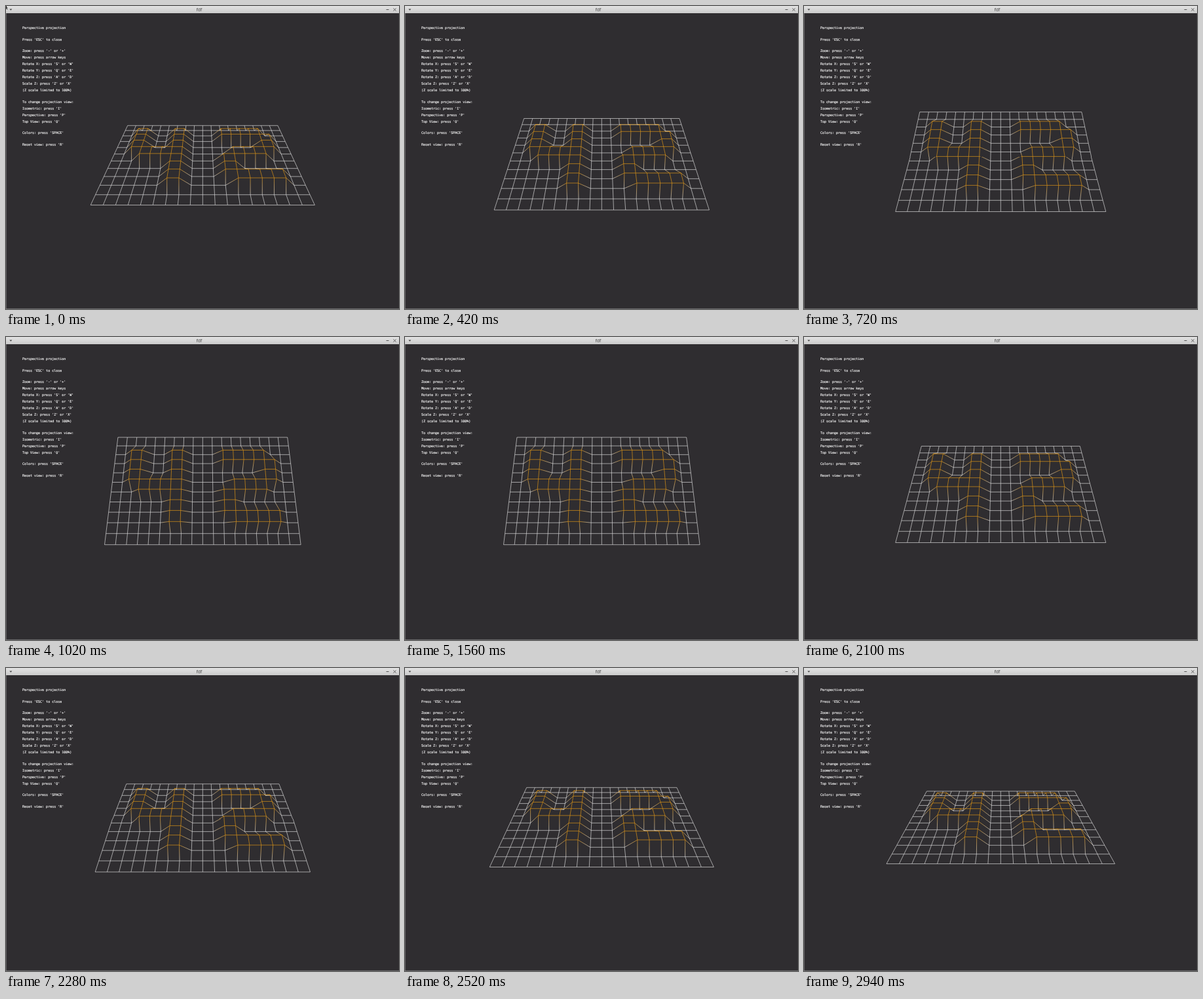
Animation of 600 by 462 pixels, one loop 3 s. Source, as an HTML page with a canvas:

```html
<!DOCTYPE html>
<html lang="en">
<head>
<meta charset="utf-8">
<title>fdf</title>
<style>
  html, body { margin: 0; width: 100%; height: 100%; overflow: hidden; background: #2f2d30; }
  canvas { display: block; width: 600px; height: 462px; }
</style>
</head>
<body>
<canvas id="view" width="600" height="462"></canvas>
<script>
const ctx = document.getElementById('view').getContext('2d');
const W = 600, H = 462, BAR = 11, LOOP = 3000, FRAME = 60;
const CX = 300.3, CY = 236.3, CELL = 15.53, CAMERA = 300, TEAR = 230;
const LOW = '#f4f4f4', HIGH = '#f5a313';

// height map: # is raised by one cell
const map = [
  '...................',
  '...................',
  '..##..##...#####...',
  '..##..##...######..',
  '..##..##.......##..',
  '..######....#####..',
  '...#####...#####...',
  '......##...##......',
  '......##...######..',
  '......##....#####..',
  '...................',
  '...................'
];

// key points of the tilt: [ms, degrees]
const keys = [[0, 45], [540, 32.5], [1290, 5], [1740, 22.5], [2220, 32.5], [2330, 42.5], [2820, 47.5], [LOOP, 50]];

const help = `Perspective projection

Press 'ESC' to close

Zoom: press '-' or '+'
Move: press arrow keys
Rotate X: press 'S' or 'W'
Rotate Y: press 'Q' or 'E'
Rotate Z: press 'A' or 'D'
Scale Z: press 'Z' or 'X'
(Z scale limited to 100%)

To change projection view:
Isometric: press 'I'
Perspective: press 'P'
Top View: press 'O'

Colors: press 'SPACE'

Reset view: press 'R'`.split('\n');

// linear between key points, turned in steps of 5 degrees
function tiltAt(t) {
  if (t <= 0) return keys[0][1];
  const i = keys.findIndex(k => k[0] > t);
  const [t0, a0] = keys[i - 1], [t1, a1] = keys[i];
  const deg = a0 + (a1 - a0) * (t - t0) / (t1 - t0);
  return 5 * Math.round(deg / 5);
}

function project(col, row, deg) {
  const a = deg * Math.PI / 180, sin = Math.sin(a), cos = Math.cos(a);
  const high = map[row][col] === '#';
  const x = (col - 9) * CELL, y = (row - 6) * CELL, z = high ? CELL : 0;
  const k = CAMERA / (CAMERA - y * sin - z * cos);
  return { x: CX + x * k, y: CY + (y * cos - z * sin) * k, color: high ? HIGH : LOW };
}

function edge(p, q) {
  let style = p.color;
  if (p.color !== q.color) {
    style = ctx.createLinearGradient(p.x, p.y, q.x, q.y);
    style.addColorStop(0, p.color);
    style.addColorStop(1, q.color);
  }
  ctx.strokeStyle = style;
  ctx.beginPath();
  ctx.moveTo(p.x, p.y);
  ctx.lineTo(q.x, q.y);
  ctx.stroke();
}

function drawMesh(deg, top, bottom) {
  ctx.save();
  ctx.beginPath();
  ctx.rect(0, top, W, bottom - top);
  ctx.clip();
  ctx.lineWidth = 0.6;
  const pts = map.map((line, r) => [...line].map((_, c) => project(c, r, deg)));
  pts.forEach((line, r) => line.forEach((p, c) => {
    if (c + 1 < line.length) edge(p, line[c + 1]);
    if (r + 1 < pts.length) edge(p, pts[r + 1][c]);
  }));
  ctx.restore();
}

function stroke(color, ...lines) {
  ctx.strokeStyle = color;
  ctx.lineWidth = 1;
  ctx.beginPath();
  for (const [x1, y1, x2, y2] of lines) {
    ctx.moveTo(x1, y1);
    ctx.lineTo(x2, y2);
  }
  ctx.stroke();
}

function drawWindow() {
  ctx.fillStyle = '#2f2d30';
  ctx.fillRect(0, 0, W, H);
  const g = ctx.createLinearGradient(0, 0, 0, BAR);
  g.addColorStop(0, '#e2e2e2');
  g.addColorStop(1, '#cbcbcb');
  ctx.fillStyle = g;
  ctx.fillRect(0, 0, W, BAR);
  ctx.fillStyle = '#8c8c8c';
  ctx.fillRect(0, BAR, 0.5, H - BAR);
  ctx.fillRect(0, H - 0.6, W, 0.6);

  ctx.textBaseline = 'middle';
  ctx.fillStyle = '#444';
  ctx.textAlign = 'center';
  ctx.font = '6.5px "Noto Sans", "DejaVu Sans", sans-serif';
  ctx.fillText('fdf', 295, 5.8);
  ctx.beginPath();
  ctx.moveTo(5.3, 4.5);
  ctx.lineTo(9.3, 4.5);
  ctx.lineTo(7.3, 6.8);
  ctx.fill();
  stroke('#555', [580.5, 5.5, 584.5, 5.5], [591.5, 3.5, 595.5, 7.5], [595.5, 3.5, 591.5, 7.5]);
}

function drawHelp() {
  ctx.fillStyle = ctx.strokeStyle = '#fff';
  ctx.lineWidth = 0.15;
  ctx.textAlign = 'left';
  ctx.font = '5px "DejaVu Sans Mono", "Liberation Mono", monospace';
  let y = 34;
  for (const text of help) {
    ctx.fillText(text, 25, y);
    ctx.strokeText(text, 25, y);
    y += text ? 10 : 7.5;
  }
}

function draw(time) {
  const t = Math.floor(time / FRAME) * FRAME;
  drawWindow();
  // the lower part of the screen is redrawn one frame late
  drawMesh(tiltAt(t), BAR, TEAR);
  drawMesh(tiltAt(t - FRAME), TEAR, H);
  drawHelp();
  // pointer tip in the corner
  if (t === 0) stroke('#222', [0.5, 0, 0.5, 4.5], [0.5, 1.5, 2.5, 3], [1, 4, 2.5, 5]);
}

const start = performance.now();
function tick() {
  draw((performance.now() - start) % LOOP);
  requestAnimationFrame(tick);
}
tick();
</script>
</body>
</html>
```
